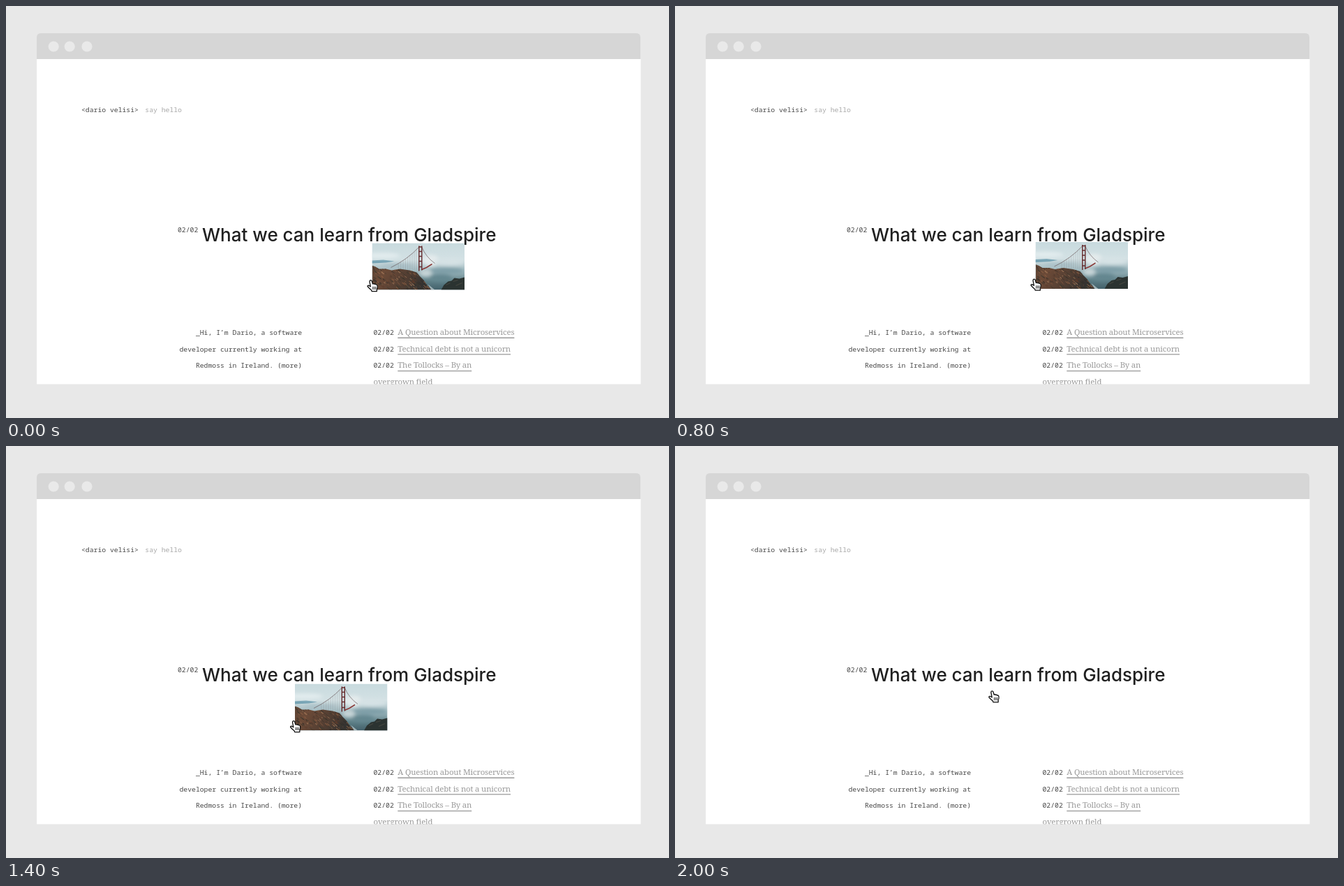
Write an HTML page that moves like this. It is 950x590 px and loops after 2.1 s.

```html
<!DOCTYPE html>
<html lang="en">
<head>
<meta charset="utf-8">
<title>Portfolio hover</title>
<style>
  html, body { margin: 0; width: 950px; height: 590px; overflow: hidden; background: #e8e8e8; }
  svg { display: block; }
  text { white-space: pre; }
  .mono { font: 500 9.75px "Noto Sans Mono", "DejaVu Sans Mono", monospace; fill: #484848; }
  .soft { fill: #a9a9a9; }
  .num { font-weight: 400; }
  .title { font: 500 26px Inter, Lato, sans-serif; fill: #202020; }
  .link { font: 300 11.4px "Noto Serif", serif; letter-spacing: -.17px; fill: #9a9a9a; }
  .rule { stroke: #989898; stroke-width: 1.4; }
  .right { text-anchor: end; }
</style>
</head>
<body>
<svg width="950" height="590" viewBox="0 0 950 590">
  <defs>
    <clipPath id="page"><rect x="44" y="76" width="865.5" height="465.5"/></clipPath>
    <clipPath id="frame"><rect width="132.5" height="67"/></clipPath>
    <clipPath id="hillClip"><path d="M0 32 5 34 10 37 20 37 28 39 40 37 54 39 64 42 68 47 74 53 78 59 85 67H0Z"/></clipPath>
    <linearGradient id="sky" x2="0" y2="1">
      <stop offset="0" stop-color="#c8dade"/>
      <stop offset=".35" stop-color="#d3e1e4"/>
      <stop offset=".6" stop-color="#a0b9bf"/>
      <stop offset=".82" stop-color="#5d7f87"/>
      <stop offset="1" stop-color="#43606a"/>
    </linearGradient>
    <linearGradient id="hill" x2="1" y2=".5">
      <stop offset="0" stop-color="#4f4136"/>
      <stop offset=".4" stop-color="#6c4a37"/>
      <stop offset=".75" stop-color="#503d32"/>
      <stop offset="1" stop-color="#343331"/>
    </linearGradient>
    <filter id="blur" x="-50%" y="-80%" width="200%" height="260%"><feGaussianBlur stdDeviation="2.8"/></filter>
  </defs>

  <path d="M44 76V45q0-6 6-6H903q6 0 6 6V76Z" fill="#d6d6d6"/>
  <g fill="#e9e9e9">
    <circle cx="68.2" cy="58" r="7.6"/>
    <circle cx="91.2" cy="58" r="7.6"/>
    <circle cx="116" cy="58" r="7.6"/>
  </g>
  <rect x="44" y="76" width="865.5" height="465.5" fill="#fff"/>

  <g id="copy" clip-path="url(#page)"></g>

  <g id="pointer">
    <g id="photo" clip-path="url(#frame)">
      <rect width="132.5" height="67" fill="url(#sky)"/>
      <path d="M0 25 16 24 32 26 20 28 0 29Z" fill="#74a2b3"/>
      <g filter="url(#blur)">
        <ellipse cx="14" cy="18" rx="26" ry="4" fill="#e2ecee"/>
        <ellipse cx="106" cy="40" rx="26" ry="5" fill="#7f9fa8"/>
        <ellipse cx="84" cy="25" rx="12" ry="8" fill="#e4ebec"/>
        <ellipse cx="110" cy="27" rx="22" ry="5" fill="#d6e2e5"/>
        <ellipse cx="36" cy="33" rx="24" ry="3" fill="#a9c0c7"/>
        <ellipse cx="77" cy="43" rx="9" ry="5" fill="#c6d4d7"/>
        <ellipse cx="98" cy="50" rx="16" ry="5" fill="#64868f"/>
      </g>
      <g fill="none" stroke="#5f4a4c" stroke-width=".6">
        <path d="M68 5Q50 24 27 35M71 5Q77 20 90 29"/>
        <path id="hangers" stroke-width=".25" opacity=".6"/>
      </g>
      <path d="M71 38 78 35 86 30" fill="none" stroke="#8a3a38" stroke-width="1.5"/>
      <path d="M67.3 4V40M71.3 4V39" stroke="#652b2d" stroke-width="1.4"/>
      <path d="M67 5.5H71.5M67 12H71.5M67 19H71.5M67 26H71.5M67 34H71.5" stroke="#652b2d" stroke-width="1.4"/>
      <g clip-path="url(#hillClip)">
        <rect width="90" height="67" fill="url(#hill)"/>
        <g id="rocks" stroke-linecap="round"></g>
      </g>
      <path d="M80 59 85 63 90 67H85Z" fill="#c3d2d3" opacity=".7"/>
      <path d="M99 67 103 60 109 55 114 54 118 50 125 51 132.5 49V67Z" fill="#2b3331"/>
      <path d="M106 60 112 57M116 55 123 53M120 61 129 57" stroke="#45463f" stroke-width="1.2"/>
    </g>
    <g transform="translate(-7.4 52.3)" stroke="#111" stroke-width="1.3" stroke-linejoin="round">
      <path d="M4.3 1.4Q5.7 0 7 1.8L8.3 6.2Q9.5 5.2 10.6 6.5 11.9 5.7 12.8 7.1 14.5 6.7 15 8.4 15.5 11 14.4 13.4L14.2 16.9H7L6.6 15.3Q3.8 13 1.1 10 .6 8.3 2.5 8.3L5.3 10 3.9 3Z" fill="#fff"/>
      <path d="M8.6 10V14.3M10.6 10V14.3M12.6 10V14.3" fill="none" stroke-width=".9"/>
    </g>
  </g>
</svg>

<script>
  const $ = id => document.getElementById(id);

  function add(parent, tag, attrs, content = "") {
    const el = document.createElementNS("http://www.w3.org/2000/svg", tag);
    for (const key in attrs) el.setAttribute(key, attrs[key]);
    el.textContent = content;
    return parent.appendChild(el);
  }

  const copy = $("copy");
  const write = (x, y, cls, content) => add(copy, "text", { x, y, class: cls }, content);

  write(108, 152, "mono", "<dario velisi>");
  write(199.3, 152, "mono soft", "say hello");
  write(246, 323.5, "mono num", "02/02");
  write(281, 337, "title", "What we can learn from Gladspire");

  ["_Hi, I’m Dario, a software", "developer currently working at", "Redmoss in Ireland. (more)"]
    .forEach((line, i) => write(424, 471 + i * 23.7, "mono right", line));

  function link(x, y, content) {
    const text = write(x, y, "link", content);
    const ruleY = y + 4.2;
    add(copy, "line", { class: "rule", x1: x, x2: x + text.getComputedTextLength(), y1: ruleY, y2: ruleY });
  }
  ["A Question about Microservices", "Technical debt is not a unicorn", "The Tollocks – By an"]
    .forEach((line, i) => {
      const y = 471 + i * 23.7;
      write(526.5, y, "mono", "02/02");
      link(561.3, y, line);
    });
  link(526.5, 542, "overgrown field");

  // Bridge hangers run from the left cable down to the deck.
  let hangers = "";
  for (let u = 0.12; u < 0.8; u += 0.08) {
    const v = 1 - u;
    const x = v * v * 68 + 2 * u * v * 50 + u * u * 27;
    const y = v * v * 5 + 2 * u * v * 24 + u * u * 35;
    hangers += `M${x} ${y}V38`;
  }
  $("hangers").setAttribute("d", hangers);

  // Seeded strokes give the hillside its rocky grain.
  let seed = 7;
  const rand = () => (seed = (seed * 16807) % 2147483647) / 2147483647;
  const tones = ["#2b2826", "#8d6044", "#a47a5a", "#3d3a2f", "#5d3b2b"];
  for (let i = 0; i < 220; i++) {
    const x = rand() * 86, y = 34 + rand() * 33, len = 0.6 + rand() * 3;
    add($("rocks"), "path", {
      d: `M${x} ${y}l${len} ${len * 0.8}`,
      stroke: tones[Math.floor(rand() * tones.length)],
      "stroke-width": 0.5 + rand() * 0.9,
      opacity: 0.75
    });
  }

  // Time in ms, then the photo's left and top; the hand hangs off its lower left.
  const LOOP = 2100, LEAVE = 2000;
  const steps = [
    [0, 524.5, 339.5], [100, 524, 339], [200, 523.5, 338.5], [300, 523.2, 338.2],
    [500, 523, 337.5], [600, 522.5, 337], [700, 520.5, 337], [800, 516.5, 338],
    [900, 511.5, 340], [1000, 506.3, 341.5], [1100, 487, 352], [1200, 455.5, 364.5],
    [1300, 397.5, 367], [1400, 414, 340.5], [1600, 414.5, 338], [1700, 415.7, 334],
    [1800, 416.5, 331], [1900, 416.3, 331.5], [LEAVE, 456.3, 297.7]
  ];

  const start = performance.now();
  function draw() {
    const t = (performance.now() - start) % LOOP;
    const [, x, y] = steps.findLast(step => step[0] <= t);
    $("pointer").setAttribute("transform", `translate(${x} ${y})`);
    $("photo").style.display = t < LEAVE ? "" : "none";
    requestAnimationFrame(draw);
  }
  draw();
</script>
</body>
</html>
```
